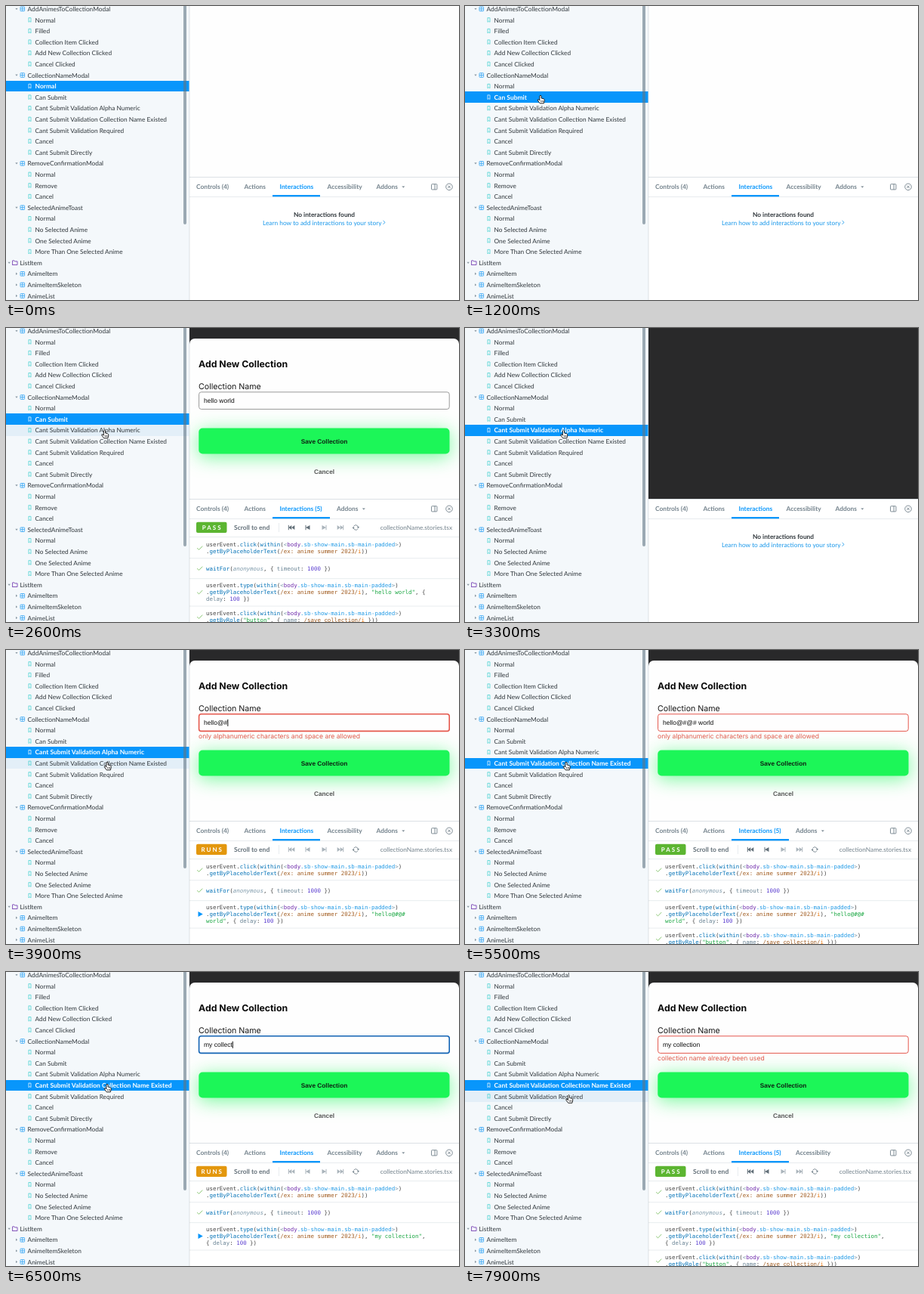
An HTML page with a canvas that plays this animation: 600x389 px, repeating every 8000 ms.

```html
<!DOCTYPE html>
<html lang="en">
<head>
<meta charset="utf-8">
<title>Story interactions</title>
<style>
html, body { margin: 0; width: 100%; height: 100%; overflow: hidden; background: #fff; }
canvas { display: block; width: 600px; height: 389px; }
</style>
</head>
<body>
<canvas id="stage"></canvas>
<script>
const W = 600, H = 389, LOOP = 8000, SIDE = 243, PANEL = 226;
const cv = document.getElementById('stage');
const c = cv.getContext('2d');
const dpr = window.devicePixelRatio || 1;
cv.width = W * dpr;
cv.height = H * dpr;

const UI = 'Lato, "Open Sans", sans-serif';
const HEAD = 'Inter, sans-serif';
const FORM = '"Liberation Sans", Arial, sans-serif';
const MONO = '"DejaVu Sans Mono", monospace';
const BLUE = '#0896fb', MUTED = '#73828c', INK = '#30373c', RED = '#e5584d', LINE = '#e3e8ec';

// depth and label; depth 2 is a story
const tree = [
  [1, 'AddAnimesToCollectionModal'], [2, 'Normal'], [2, 'Filled'], [2, 'Collection Item Clicked'],
  [2, 'Add New Collection Clicked'], [2, 'Cancel Clicked'],
  [1, 'CollectionNameModal'], [2, 'Normal'], [2, 'Can Submit'],
  [2, 'Cant Submit Validation Alpha Numeric'], [2, 'Cant Submit Validation Collection Name Existed'],
  [2, 'Cant Submit Validation Required'], [2, 'Cancel'], [2, 'Cant Submit Directly'],
  [1, 'RemoveConfirmationModal'], [2, 'Normal'], [2, 'Remove'], [2, 'Cancel'],
  [1, 'SelectedAnimeToast'], [2, 'Normal'], [2, 'No Selected Anime'], [2, 'One Selected Anime'],
  [2, 'More Than One Selected Anime'],
  [0, 'ListItem'], [1, 'AnimeItem'], [1, 'AnimeItemSkeleton'], [1, 'AnimeList']
];
const ROW = 14.6, ROW0 = 3.9, CLOSED = 24;

// each story: click, then a dark canvas, then the sheet opens and typing begins
const CHAR_MS = 88, CLICK_LEAD = 190, DARK_LEAD = 100, SAVE_MS = 40;
const stories = [
  { row: 7, open: -1000 },
  { row: 8, open: 1380, text: 'hello world',
    args: ['b), |q"hello world"|b, {', 'kdelay|b: |n100|b })'] },
  { row: 9, open: 3335, text: 'hello@#@# world',
    error: 'only alphanumeric characters and space are allowed', errorAt: 6,
    args: ['b), |q"hello@#@#', 'qworld"|b, { |kdelay|b: |n100|b })'] },
  { row: 10, open: 5680, text: 'my collection',
    error: 'collection name already been used', errorAt: 99, wideTabs: true,
    args: ['b), |q"my collection"|b,', 'b{ |kdelay|b: |n100|b })'] }
];
const passTime = s => s.open + s.text.length * CHAR_MS + SAVE_MS;

// cursor stops: time, x, y of the tip
const path = [[200, 480, 190], [800, 100, 118], [1200, 100, 118], [1500, 130.5, 135], [3350, 130.5, 135],
  [3750, 134, 148], [7350, 134, 148], [7700, 137.5, 162.5]];

// code colours, chosen by the first letter of each segment
const ink = { b: '#444', m: '#0271b6', g: '#7d99aa', t: '#6f2cac', s: '#1f99e5', r: '#a15c20',
  f: '#ea7509', q: '#16a53f', n: '#5d40d0', k: '#698394', a: '#7d99aa' };
const CHAIN = '|b(|mwithin|b(|g<|tbody|s.sb-show-main.sb-main-padded|g>|b)';
const FIELD = 'b.|mgetByPlaceholderText|b(|r/ex: anime summer 2023/|fi|';
const clickLine = 'buserEvent.|mclick' + CHAIN, typeLine = 'buserEvent.|mtype' + CHAIN;

function text(s, x, y, size, color, family = UI, weight = 400, align = 'left') {
  c.font = `${weight} ${size}px ${family}`;
  c.fillStyle = color;
  c.textAlign = align;
  c.fillText(s, x, y);
}
function rect(x, y, w, h, color) {
  c.fillStyle = color;
  c.fillRect(x, y, w, h);
}
function round(x, y, w, h, r) {
  c.beginPath();
  c.roundRect(x, y, w, h, r);
}
function fillRound(x, y, w, h, r, color) {
  round(x, y, w, h, r);
  c.fillStyle = color;
  c.fill();
}
function poly(color, ...p) {
  c.beginPath();
  for (let i = 0; i < p.length; i += 2) c.lineTo(p[i], p[i + 1]);
  c.closePath();
  c.fillStyle = color;
  c.fill();
}
function line(color, width, ...p) {
  c.beginPath();
  for (let i = 0; i < p.length; i += 2) c.lineTo(p[i], p[i + 1]);
  c.strokeStyle = color;
  c.lineWidth = width;
  c.stroke();
}
function outline(x, y, w, h, color, width, r = 0) {
  round(x, y, w, h, r);
  c.strokeStyle = color;
  c.lineWidth = width;
  c.stroke();
}

function cursorAt(t) {
  if (t < path[0][0]) return null;
  let i = 0;
  while (i < path.length - 2 && t >= path[i + 1][0]) i++;
  const [t0, x0, y0] = path[i], [t1, x1, y1] = path[i + 1];
  const u = Math.min(1, (t - t0) / (t1 - t0)), e = u * u * (3 - 2 * u);
  return { x: x0 + (x1 - x0) * e, y: y0 + (y1 - y0) * e };
}

function sidebar(selected, cur) {
  rect(0, 0, SIDE, H, '#f4f8fb');
  const hover = cur && cur.x < SIDE ? Math.round((cur.y - ROW0) / ROW) : -1;
  tree.forEach(([depth, label], i) => {
    const y = ROW0 + i * ROW, on = i === selected;
    if (on || i === hover) {
      const top = Math.round(y - 7.3), end = Math.round(y + 7.3);
      rect(0, top, SIDE - .5, end - top, on ? BLUE : '#e3eff8');
    }
    if (depth === 2) {
      const col = on ? '#fff' : '#37cfcd';
      line(col, .7, 30, y - 2.8, 33, y - 2.8, 33, y + 2.8, 31.5, y + 1.6, 30, y + 2.8, 30, y - 3.1);
      text(label, 38.5, y + 3, on ? 8.5 : 8.32, on ? '#fff' : INK, UI, on ? 700 : 400);
      return;
    }
    const ax = depth ? 14 : 4.2;
    if (i >= CLOSED) poly('#8c9aa4', ax - 1, y - 1.7, ax + 1.2, y, ax - 1, y + 1.7);
    else poly('#8c9aa4', ax - 1.7, y - 1, ax + 1.7, y - 1, ax, y + 1.2);
    if (depth) {
      outline(19, y - 2.8, 5.6, 5.6, '#2fa4f5', .8, .6);
      line('#2fa4f5', .8, 21.8, y - 2.8, 21.8, y + 2.8);
      line('#2fa4f5', .8, 19, y, 24.6, y);
    } else {
      line('#7a44b5', .9, 8.6, y + 2.8, 8.6, y - 2.8, 11, y - 2.8, 11.8, y - 1.8, 15, y - 1.8,
        15, y + 2.8, 8.2, y + 2.8);
    }
    text(label, depth ? 28.5 : 18.5, y + 3, 8.36, INK);
  });
  fillRound(235, -10, 4, 299, 2, 'rgba(98,118,132,.6)');
}

function modal(s, t) {
  const n = Math.min(s.text.length, 1 + Math.floor((t - s.open) / CHAR_MS));
  const typed = s.text.slice(0, n);
  const passed = t >= passTime(s);
  const bad = s.error && (passed || n >= s.errorAt);
  c.save();
  c.translate(0, 208 * Math.exp((s.open - t) / 55));
  fillRound(SIDE, 14, W - SIDE, 260, [7, 7, 0, 0], '#fefefe');
  text('Add New Collection', 255, 52.3, 12.3, '#0c0c0c', HEAD, 700);
  text('Collection Name', 255, 80.8, 10.65, '#161616', HEAD);
  const edge = bad ? RED : passed ? '#9a9a9a' : '#1263b4';
  outline(255.6, 84.8, 331.6, 22.6, edge, passed ? 1 : 1.6, 3);
  text(typed, 262, 99.3, 8.5, '#0c0c0c', FORM);
  if (!passed) rect(262 + c.measureText(typed).width, 91.8, 1, 9, '#111');
  if (bad) text(s.error, 255, 116.8, 8.6, RED, HEAD);
  c.shadowColor = 'rgba(28,246,90,.6)';
  c.shadowBlur = 24 * dpr;
  c.shadowOffsetY = 4 * dpr;
  fillRound(255.3, 132.5, 332.2, 34, 5, '#1cf658');
  c.shadowColor = 'transparent';
  text('Save Collection', 421.5, 152.5, 8.25, '#0d1f12', FORM, 700, 'center');
  text('Cancel', 421.5, 193, 8.25, '#555', FORM, 700, 'center');
  c.restore();
}

function preview(s, t) {
  c.save();
  c.beginPath();
  c.rect(SIDE, 0, W - SIDE, PANEL);
  c.clip();
  rect(SIDE, 0, W - SIDE, PANEL, s.text ? '#29292a' : '#fefefe');
  if (s.text && t >= s.open) modal(s, t);
  c.restore();
}

function tabs(s, passed) {
  const tab = (label, x, on) => text(label, x, 242.2, 8.4, on ? BLUE : MUTED, UI, 700);
  const addons = x => {
    tab('Addons', x);
    poly(MUTED, x + 33.8, 238.4, x + 37.8, 238.4, x + 35.8, 240.6);
  };
  tab('Controls (4)', 252);
  tab('Actions', 315.5);
  tab(passed ? 'Interactions (5)' : 'Interactions', 362.5, true);
  if (!passed) {
    tab('Accessibility', 425.5);
    addons(490.5);
  } else if (s.wideTabs) tab('Accessibility', 438);
  else addons(438);
  rect(SIDE, 252, W - SIDE, .8, LINE);
  rect(353, 250, passed ? 76 : 63, 2.3, BLUE);
  outline(563.5, 235.7, 7.4, 7.2, MUTED, .9, .8);
  line(MUTED, .9, 568, 235.7, 568, 242.9);
  c.beginPath();
  c.arc(587, 239.3, 4.3, 0, 7);
  c.stroke();
  line(MUTED, .9, 585.3, 237.6, 588.7, 241);
  line(MUTED, .9, 588.7, 237.6, 585.3, 241);
}

function codeLine(src, y) {
  let x = 265;
  for (const seg of src.split('|')) {
    const word = seg.slice(1);
    text(word, x, y + 2.5, 7.43, ink[seg[0]], MONO, seg[0] === 'a' ? 'italic' : 400);
    x += c.measureText(word).width;
  }
}
function check(y) {
  line('#8cc875', 1, 253.2, y + .2, 255.6, y + 2.4, 260.2, y - 2.4);
}

// skip button; dir -1 points left, two = double arrow
function skip(x, dir, two, color) {
  const y = 264, end = two ? 4.2 : 3;
  rect(x + dir * end - .5, y - 3.2, 1, 6.4, color);
  for (let k = 0; k < (two ? 2 : 1); k++) {
    const tip = x + dir * (two ? end - k * 4 : end), back = tip - dir * (two ? 4 : 5.5);
    poly(color, tip, y, back, y - 3, back, y + 3);
  }
}

function steps(s, passed) {
  fillRound(252, 256.7, 40.5, 14.2, 2, passed ? '#5cb531' : '#e3970d');
  c.letterSpacing = '2px';
  text(passed ? 'PASS' : 'RUNS', 273.2, 266.8, 8, '#fff', UI, 700, 'center');
  c.letterSpacing = '0px';
  text('Scroll to end', 302, 267, 8.5, '#626f78', UI, 700);
  rect(361, 258, .8, 12, LINE);
  const back = passed ? '#626f78' : '#aab4bb';
  skip(378.5, -1, true, back);
  skip(400, -1, false, back);
  skip(421, 1, false, '#aab4bb');
  skip(442.5, 1, true, '#aab4bb');
  for (const a of [0, Math.PI]) {
    c.beginPath();
    c.arc(463.3, 264, 3.2, a + .5, a + 2.9);
    c.strokeStyle = MUTED;
    c.lineWidth = .9;
    c.stroke();
  }
  poly(MUTED, 458.6, 264.9, 461.6, 264.9, 460.1, 262.7);
  poly(MUTED, 465, 263.1, 468, 263.1, 466.5, 265.3);
  text('collectionName.stories.tsx', 591, 267, 8.28, MUTED, UI, 400, 'right');

  for (const y of [276, 304.3, 331.3, 367.6]) rect(SIDE, y, W - SIDE, .8, LINE);
  codeLine(clickLine, 286);
  codeLine(FIELD + 'b))', 295);
  check(291);
  codeLine('mwaitFor|b(|aanonymous|b, { |ktimeout|b: |n1000|b })', 318);
  check(318);
  codeLine(typeLine, 340.5);
  codeLine(FIELD + s.args[0], 349.5);
  codeLine(s.args[1], 358.3);
  if (!passed) {
    poly(BLUE, 254.5, 346, 260.8, 349.5, 254.5, 353);
    return;
  }
  check(349.5);
  codeLine(clickLine, 377.2);
  codeLine('b.|mgetByRole|b(|q"button"|b, { |kname|b: |r/save collection/|fi|b }))', 386);
  check(382);
}

function panel(s, t) {
  const open = s.text && t >= s.open, passed = open && t >= passTime(s);
  rect(SIDE, PANEL, W - SIDE, H - PANEL, '#fff');
  rect(SIDE, PANEL, W - SIDE, .9, '#d9dee2');
  tabs(s, passed);
  if (open) {
    steps(s, passed);
    return;
  }
  text('No interactions found', 421.5, 278.5, 8.35, INK, UI, 700, 'center');
  text('Learn how to add interactions to your story', 340, 289.6, 8.34, '#1a98ea');
  line('#1a98ea', .9, 499.6, 284, 502, 286.4, 499.6, 288.8);
}

const hand = new Path2D('M-1.1 1Q0-.8 1.1 1L1.1 4L4.2 4.8Q5.4 5.2 5.3 7L4.4 10.8L-.8 10.8L-3.7 6.9Q-3.9 5.3-2.5 5.8L-1.1 7Z');
const arrow = new Path2D('M0 0L0 9L2.1 7.1L3.6 10.4L5 9.8L3.5 6.6L6.3 6.4Z');
function pointer(p) {
  const overTree = p.x < SIDE, shape = overTree ? hand : arrow;
  c.save();
  c.translate(p.x, p.y);
  c.fillStyle = overTree ? '#fff' : '#111';
  c.strokeStyle = overTree ? '#111' : '#fff';
  c.lineWidth = .9;
  c.fill(shape);
  c.stroke(shape);
  if (overTree) for (const x of [.6, 2.1, 3.5]) line('#111', .6, x, 7, x, 9.2);
  c.restore();
}

function draw(t) {
  c.setTransform(dpr, 0, 0, dpr, 0, 0);
  c.textRendering = 'geometricPrecision';
  c.textBaseline = 'alphabetic';
  const chosen = stories.findLast(s => t >= s.open - CLICK_LEAD);
  const shown = stories.findLast(s => t >= s.open - DARK_LEAD);
  const cur = cursorAt(t);
  preview(shown, t);
  panel(shown, t);
  sidebar(chosen.row, cur);
  rect(SIDE - .5, 0, 1, H, 'rgba(40,60,75,.13)');
  if (cur) pointer(cur);
}

const start = performance.now();
function tick(now) {
  draw(Math.max(0, now - start) % LOOP);
  requestAnimationFrame(tick);
}
draw(0);
requestAnimationFrame(tick);
</script>
</body>
</html>
```
